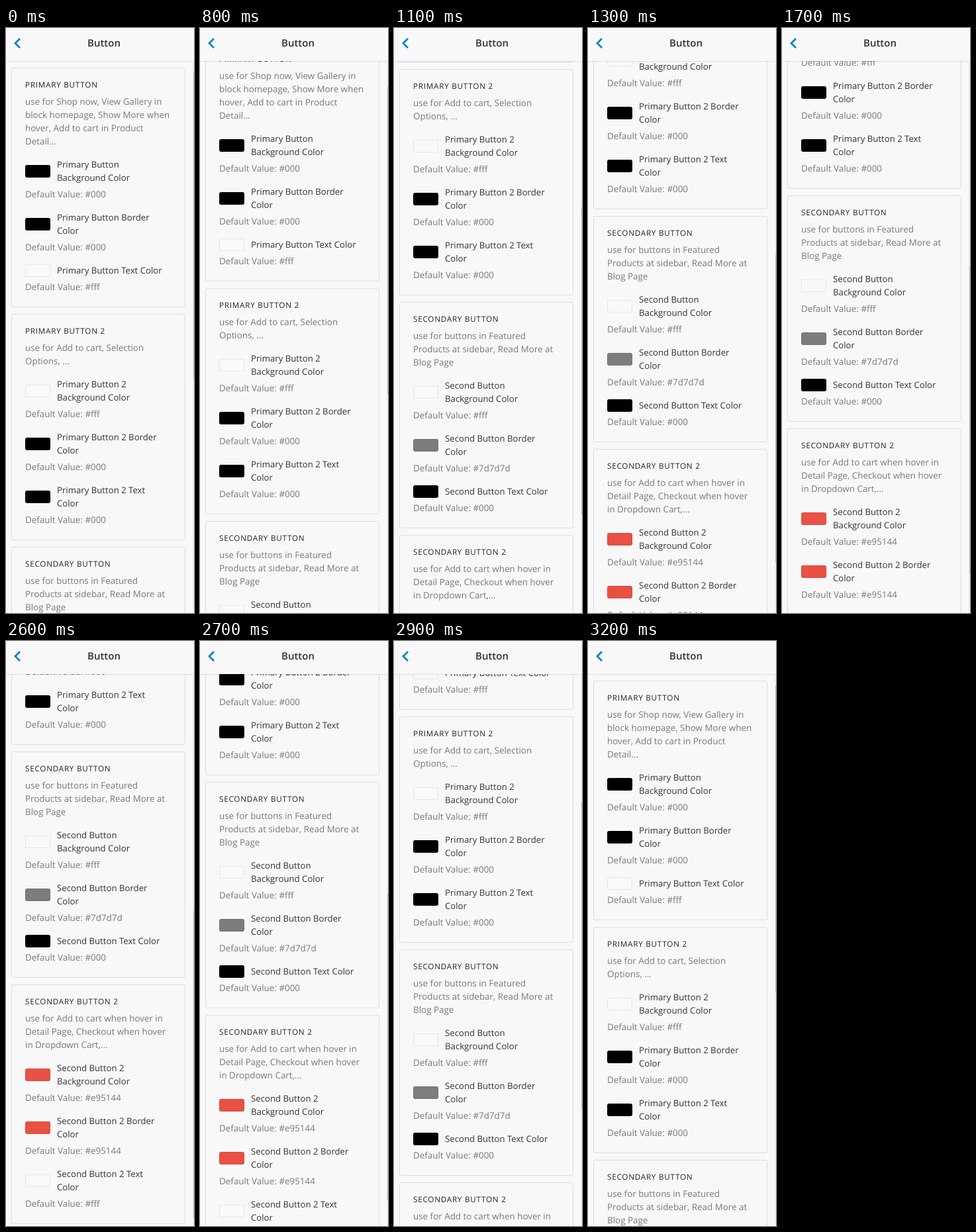
An HTML page for the animation above (4200 ms loop, 284 px wide and 884 px high).

```html
<!DOCTYPE html>
<html lang="en">
<head>
<meta charset="utf-8">
<title>Button settings</title>
<style>
  html, body { margin: 0; width: 100%; height: 100%; overflow: hidden; background: #f8f8f8; }
  #stage {
    position: relative; width: 284px; height: 884px; overflow: hidden; background: #f8f8f8;
    font: 13.4px/20px "Open Sans", "Noto Sans", sans-serif;
    text-rendering: geometricPrecision;
  }
  #stage * { box-sizing: border-box; }
  header {
    position: absolute; left: 0; top: 0; width: 284px; height: 50px; z-index: 2;
    background: #f8f8f8; box-shadow: 0 1px 0 rgba(0,0,0,.07), 0 2px 0 rgba(0,0,0,.02);
  }
  header svg { position: absolute; left: 0; top: 0; }
  h1 {
    position: absolute; left: 98px; top: 13px; width: 100px; margin: 0;
    font-size: 15px; font-weight: 600; line-height: 20px; text-align: center; color: #333;
  }
  #list { position: absolute; left: 8px; top: 60px; width: 263px; }
  .card {
    position: relative; margin-bottom: 10px; padding: 15px 0 20px 20px;
    border: 1px solid #d6e0e9; border-radius: 3px; white-space: pre;
  }
  h2 {
    margin: 0 0 5px; font-size: 11.7px; font-weight: 400; line-height: 20px;
    letter-spacing: .75px; color: #222;
  }
  .note { color: #787878; }
  .item { position: relative; margin: 15px 0 5px; padding-left: 48px; font-size: 13.2px; color: #333; }
  .swatch {
    position: absolute; left: 0; top: 50%; width: 38px; height: 19px; margin-top: -9px;
    border: 1px solid rgba(0,0,0,.08); border-radius: 3px;
  }
  #track { position: absolute; left: 282px; top: 52px; width: 2px; height: 832px; background: #f1f1f1; }
  #thumb { position: absolute; left: 283px; top: 67px; width: 1px; height: 464px; background: #bcbcbc; }
</style>
</head>
<body>
<div id="stage">
  <div id="list"></div>
  <div id="track"></div>
  <div id="thumb"></div>
  <header>
    <svg width="40" height="50"><path d="M21 16L14 23L21 30" fill="none" stroke="#0a84c1" stroke-width="2.8"/></svg>
    <h1>Button</h1>
  </header>
</div>
<script>
const LOOP = 4200;
const THUMB_RATIO = 0.552;

// title, note, then [label, default value] pairs
const cards = [
  ["PRIMARY BUTTON",
    "use for Shop now, View Gallery in\nblock homepage, Show More when\nhover, Add to cart in Product\nDetail...",
    ["Primary Button\nBackground Color", "#000"],
    ["Primary Button Border\nColor", "#000"],
    ["Primary Button Text Color", "#fff"]],
  ["PRIMARY BUTTON 2",
    "use for Add to cart, Selection\nOptions, ...",
    ["Primary Button 2\nBackground Color", "#fff"],
    ["Primary Button 2 Border\nColor", "#000"],
    ["Primary Button 2 Text\nColor", "#000"]],
  ["SECONDARY BUTTON",
    "use for buttons in Featured\nProducts at sidebar, Read More at\nBlog Page",
    ["Second Button\nBackground Color", "#fff"],
    ["Second Button Border\nColor", "#7d7d7d"],
    ["Second Button Text Color", "#000"]],
  ["SECONDARY BUTTON 2",
    "use for Add to cart when hover in\nDetail Page, Checkout when hover\nin Dropdown Cart,...",
    ["Second Button 2\nBackground Color", "#e95144"],
    ["Second Button 2 Border\nColor", "#e95144"],
    ["Second Button 2 Text\nColor", "#fff"]]
];

// [time in ms, scroll offset]; each offset holds until the next
const scrolls = [
  [0, 0], [800, 39], [900, 130], [1000, 250], [1100, 370], [1200, 463], [1300, 500],
  [1700, 531], [1800, 587], [1900, 618],
  [2600, 617], [2700, 571], [2800, 458], [2900, 318], [3000, 165], [3100, 48], [3200, 0]
];

const list = document.getElementById("list");
const thumb = document.getElementById("thumb");

function add(parent, tag, cls, text = "") {
  const el = document.createElement(tag);
  el.className = cls;
  el.textContent = text;
  parent.appendChild(el);
  return el;
}

for (const [title, note, ...items] of cards) {
  const card = add(list, "div", "card");
  add(card, "h2", "", title);
  add(card, "div", "note", note);
  for (const [label, value] of items) {
    const item = add(card, "div", "item", label);
    add(item, "div", "swatch").style.backgroundColor = value === "#fff" ? "#f9f9f9" : value;
    add(card, "div", "note", "Default Value: " + value);
  }
}

function scrollAt(t) {
  let y = 0;
  for (const [time, offset] of scrolls) if (t >= time) y = offset;
  return y;
}

function draw(t) {
  const y = scrollAt(t);
  list.style.top = 60 - y + "px";
  thumb.style.top = 67 + Math.round(y * THUMB_RATIO) + "px";
}

const start = performance.now();
function tick() {
  draw((performance.now() - start) % LOOP);
  requestAnimationFrame(tick);
}
draw(0);
requestAnimationFrame(tick);
</script>
</body>
</html>
```
